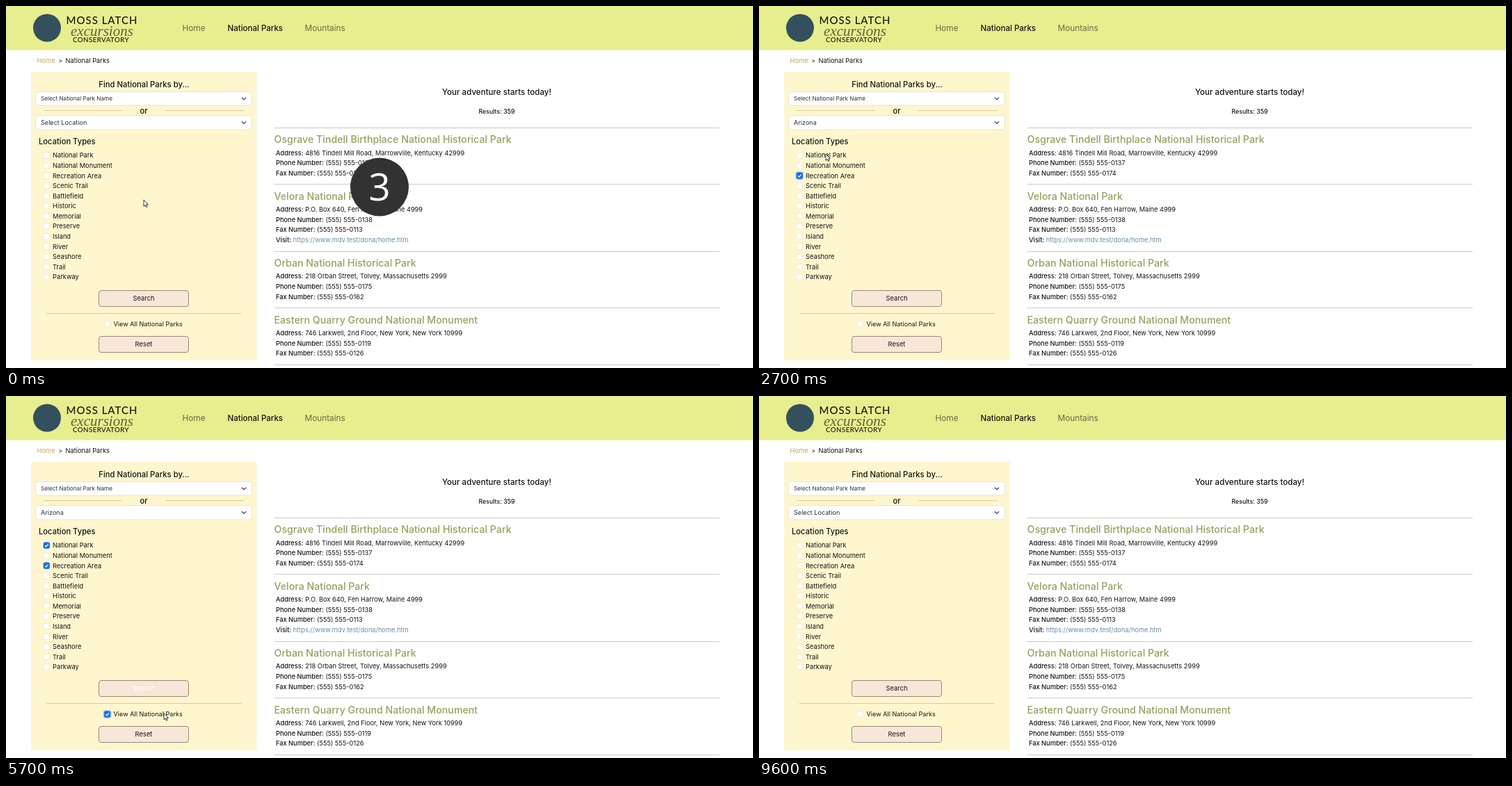
Write an HTML page that moves like this. It is 1074 px wide and 521 px high and loops after 9800 ms.

```html
<!DOCTYPE html>
<html lang="en">
<head>
<meta charset="utf-8">
<title>Park finder</title>
<style>
  html, body { margin: 0; width: 100%; height: 100%; overflow: hidden; background: #fff; }
  svg { display: block; width: 100vw; height: 100vh; font-family: Inter, "Open Sans", sans-serif; }
</style>
</head>
<body>
<svg viewBox="0 0 1074 521" xmlns="http://www.w3.org/2000/svg"><g id="page"></g><g id="live"></g></svg>
<script>
const LOOP = 9800, STEP = 100;
const INK = '#151515', GREEN = '#96a25e', PANEL = '#fff6ce';

// Text is placed by the vertical middle of its capitals.
const text = (x, y, str, size, attrs = '') =>
  `<text x="${x}" y="${y + size * .36}" font-size="${size}" fill="${INK}" ${attrs}>${str}</text>`;
const ink = color => `style="fill:${color}"`;
const MID = 'text-anchor="middle"', MEDIUM = 'font-weight="500"';
const rect = (x, y, w, h, fill, attrs = '') =>
  `<rect x="${x}" y="${y}" width="${w}" height="${h}" fill="${fill}" ${attrs}/>`;
const rule = (x1, x2, y, color) => rect(x1, Math.floor(y), x2 - x1, 1, color);
const during = (t, from, to) => t >= from && t < to;

const TYPES = ['National Park', 'National Monument', 'Recreation Area', 'Scenic Trail', 'Battlefield',
  'Historic', 'Memorial', 'Preserve', 'Island', 'River', 'Seashore', 'Trail', 'Parkway'];
const PLACES = ['Select Location', 'Alabama', 'Alaska', 'American Samoa', 'Arizona', 'Arkansas', 'California',
  'Colorado', 'Connecticut', 'Delaware', 'DC', 'Florida', 'Georgia', 'Guam', 'Hawaii', 'Idaho', 'Illinois',
  'Indiana', 'Iowa', 'Kansas'];

const park = (name, address, phone, fax, visit) =>
  ({ name, rows: [['Address', address], ['Phone Number', phone], ['Fax Number', fax], ['Visit', visit]].filter(r => r[1]) });
const ALL = [
  park('Osgrave Tindell Birthplace National Historical Park', '4816 Tindell Mill Road, Marrowville, Kentucky 42999',
    '(555) 555-0137', '(555) 555-0174'),
  park('Velora National Park', 'P.O. Box 640, Fen Harrow, Maine 4999',
    '(555) 555-0138', '(555) 555-0113', 'https://www.mdv.test/dona/home.htm'),
  park('Orban National Historical Park', '218 Orban Street, Tolvey, Massachusetts 2999',
    '(555) 555-0175', '(555) 555-0162'),
  park('Eastern Quarry Ground National Monument', '746 Larkwell, 2nd Floor, New York, New York 10999',
    '(555) 555-0119', '(555) 555-0126')
];
const FOUND = [
  park('Dusk Hollow National Recreation Area', 'Dusk Hollow NRA, PO Box 2864, Tarn, Arizona 86999'),
  park('Ochre Plains National Park', 'Ochre Plains National Park, P.O. Box 731, Ochre Plains, Arizona 86998',
    '(555) 555-0188', '(555) 555-0197'),
  park('Whispering Dunes National Park',
    'Superintendent, Whispering Dunes National Park, PO Box 4470, Whispering Dunes, Arizona 86997', '', '(555) 555-0167'),
  park('Tolmera National Park', 'Tolmera National Park, 5127 North Red Sparrow Trail, Cassel, Arizona 85998',
    '', '(555) 555-0183'),
  park('Melandoria National Historical Park', 'Superintendent, P. O. Box 5392, Melandoria, Arizona 85999',
    '(555) 555-0141', '(555) 555-0171')
];

function results(parks, count) {
  let y = 175.3, out = text(705.5, 151.5, 'Results: ' + count, 8.8, MID + MEDIUM);
  for (const { name, rows } of parks) {
    out += rule(385.5, 1026, y, '#cbcbc8') + text(385.5, y + 17, name, 14.2, MEDIUM + ink(GREEN));
    rows.forEach(([label, value], i) => {
      const color = label === 'Visit' ? '#6b8ca6' : INK;
      out += text(388, y + 36 + i * 14.6,
        `<tspan font-weight="500">${label}:</tspan> <tspan fill="${color}">${value}</tspan>`, 9.25);
    });
    y += 37.8 + rows.length * 14.6;
  }
  return out + rule(385.5, 1026, y, '#cbcbc8');
}

function select(y, h, label, size, focus) {
  const glow = focus ? rect(41, y - 1.5, 314, h + 3, 'none', 'rx="5" stroke="#c2dbfe" stroke-width="2"') : '';
  return glow + rect(42.5, y, 311, h, '#fff', `rx="4" stroke="${focus ? '#86b7fe' : '#e6e4d6'}"`) +
    text(50, y + h / 2, label, size, ink('#2b3035')) +
    `<path d="M338.8 ${y + h / 2 - 1.5}l3.1 3 3.1-3" fill="none" stroke="#343a40" stroke-width="1.1"/>`;
}

function checkbox(x, y, { checked, focus, pressed } = {}) {
  const glow = focus ? rect(x - 6, y - 6, 12, 12, '#b9d3ee', 'rx="3"') : '';
  const fill = checked ? '#0d6efd' : pressed ? '#e8e6e0' : '#fff';
  const line = checked ? '#0d6efd' : focus ? '#86b7fe' : pressed ? '#cfcdc4' : '#e9e4cf';
  return glow + rect(x - 4.3, y - 4.3, 8.6, 8.6, fill, `rx="2" stroke="${line}" stroke-width=".8"`) +
    (checked ? `<path d="M${x - 2.2} ${y + .2}l1.6 1.6 2.9-3.3" fill="none" stroke="#fff" stroke-width="1.3"/>` : '');
}

const button = (y, label, color) =>
  rect(133.5, y - 11.5, 129, 23, '#f8e6d8', 'rx="3.5" stroke="#8f7f66" stroke-width=".9"') +
  text(198, y, label, 9.4, MID + ink(color));

function menu(pointerY) {
  const rowH = 14.6, top = 179, row = Math.max(0, Math.floor((pointerY - top) / rowH));
  return rect(44, 181, 311, 292, '#000', 'opacity=".12"') +
    rect(42.5, top - .5, 311, 292, '#fff', 'stroke="#767676"') +
    rect(43, top + row * rowH, 310, rowH, '#ade4ff') +
    PLACES.map((p, i) => text(50, 186.2 + i * rowH, p, 9.2, i === row ? ink('#fff') : '')).join('') +
    rect(345, 180, 7, 103, '#000', 'opacity=".23"');
}

// Pointer stops: time, x, y
const PATH = [[0, 198, 279], [400, 238, 170], [500, 238, 170], [700, 237, 251.5], [1100, 237, 251.5],
  [1700, 97, 243], [2300, 97, 243], [2700, 96, 213], [3000, 96, 213], [3700, 225, 426], [4700, 225, 426],
  [5100, 227, 456.5], [7400, 227, 456.5], [7700, 226, 488], [8700, 226, 488], [9300, 205, -20], [LOOP, 205, -20]];
// Presses: from, to, halo radius
const PRESSES = [[400, 600, 14], [1000, 1100, 14], [1900, 2100, 14], [2900, 3100, 14], [3900, 4100, 17],
  [5300, 5500, 14], [6500, 6800, 14], [8000, 8300, 14]];

function pointerAt(t) {
  const i = PATH.findIndex(p => p[0] > t), [t0, x0, y0] = PATH[i - 1], [t1, x1, y1] = PATH[i];
  const k = (t - t0) / (t1 - t0), e = k * k * (3 - 2 * k);
  return [x0 + (x1 - x0) * e, y0 + (y1 - y0) * e];
}

const ARROW = 'M0 0V9.4L2.1 7.5 3.5 10.6 5 9.9 3.6 6.9H6.5Z';
const HAND = 'M-1 1Q0-.6 1 1V5L5 6Q6 6.3 5.9 7.4L5.2 12.4H-.4L-3.6 8Q-3.8 6.6-2.4 7L-1 8.2Z';

function pointer(t, x, y, hand) {
  const press = PRESSES.find(([from, to]) => during(t, from, to));
  return (press ? `<circle cx="${x - .5}" cy="${y}" r="${press[2]}" fill="#eedd3c" opacity=".82"/>` : '') +
    `<path transform="translate(${x} ${y})" d="${hand ? HAND : ARROW}" fill="#fff" stroke="#222" stroke-width=".9" stroke-linejoin="round"/>`;
}

function page() {
  return rect(0, 0, 1074, 63.4, '#e7ee8d') +
    '<circle cx="59" cy="31.5" r="20" fill="#34505f"/>' +
    text(86.5, 20.5, 'MOSS LATCH', 15, 'font-family="Lato, sans-serif" font-weight="500" letter-spacing="1"') +
    text(93, 35, 'excursions', 21, 'font-family="Liberation Serif, serif" font-style="italic"' + ink('#655f45')) +
    text(96, 48, 'CONSERVATORY', 9.8, 'font-family="Lato, sans-serif" font-weight="500" letter-spacing=".4"') +
    text(253.5, 31.5, 'Home', 11.8, ink('#6b6a42')) +
    text(318.5, 31.5, 'National Parks', 11.5, MEDIUM) +
    text(429.5, 31.5, 'Mountains', 11.8, ink('#6b6a42')) +
    text(44.5, 78.5, 'Home', 9.4, ink('#c9a365')) + text(75.5, 78.5, '&gt;', 8.5) +
    text(85.5, 78.5, 'National Parks', 9.3) +
    rect(36, 95, 324.5, 415, PANEL) +
    text(198.5, 113, 'Find National Parks by...', 11.3, MID + MEDIUM) +
    select(123.5, 19.5, 'Select National Park Name', 8.2) +
    rule(54, 167, 150, '#d3c9a2') + rule(229, 343, 150, '#d3c9a2') +
    text(198, 151, 'or', 11.2, MID + MEDIUM) +
    text(47, 195, 'Location Types', 11.2, MEDIUM) +
    TYPES.map((name, i) => text(67, 215 + i * 14.58, name, 9.3)).join('') +
    rule(58, 338.5, 442, '#d3c9a2') +
    text(154.5, 458, 'View All National Parks', 9.15) +
    text(705.5, 124, 'Your adventure starts today!', 11.6, MID + MEDIUM);
}

function live(t) {
  const [x, y] = pointerAt(t);
  const over = mid => Math.abs(x - 198) < 64 && Math.abs(y - mid) < 12;
  const open = during(t, 500, 1100);
  const onSearch = !open && over(421), onReset = !open && over(487);
  const chosen = during(t, 1100, 8200), viewAll = during(t, 5500, 6700);
  const filtered = during(t, 4000, 8200) && !viewAll;
  const boxes = {
    0: { checked: during(t, 3000, 8200), focus: during(t, 3000, 3900) },
    2: { checked: during(t, 2000, 8200), focus: during(t, 2000, 3000) }
  };
  const searchInk = during(t, 5500, 6800) ? '#fff' : onSearch || during(t, 6800, 6900) ? '#a0948a' : INK;
  return (filtered ? results(FOUND, 5) : results(ALL, 359)) +
    select(157.5, 20.5, chosen ? 'Arizona' : 'Select Location', 9.1, during(t, 500, 2000)) +
    TYPES.map((_, i) => checkbox(58.3, 215 + i * 14.58, boxes[i])).join('') +
    button(421, 'Search', searchInk) +
    checkbox(145.6, 458, {
      checked: viewAll, focus: during(t, 5500, 8000),
      pressed: during(t, 5300, 5500) || during(t, 6500, 6700)
    }) +
    button(487, 'Reset', onReset ? '#a0948a' : INK) +
    (open ? menu(y) : '') +
    (t < 100 ? '<circle cx="537" cy="260.5" r="42" fill="#323232"/>' +
      text(537, 260.5, '3', 55, MID + 'font-family="Open Sans, sans-serif"' + ink('#fff')) : '') +
    pointer(t, x, y, onSearch || onReset);
}

const liveLayer = document.getElementById('live');
document.getElementById('page').innerHTML = page();
const start = performance.now();
let shown = -1;
function draw() {
  const t = Math.floor((performance.now() - start) % LOOP / STEP) * STEP;
  if (t !== shown) liveLayer.innerHTML = live(shown = t);
  requestAnimationFrame(draw);
}
draw();
</script>
</body>
</html>
```
